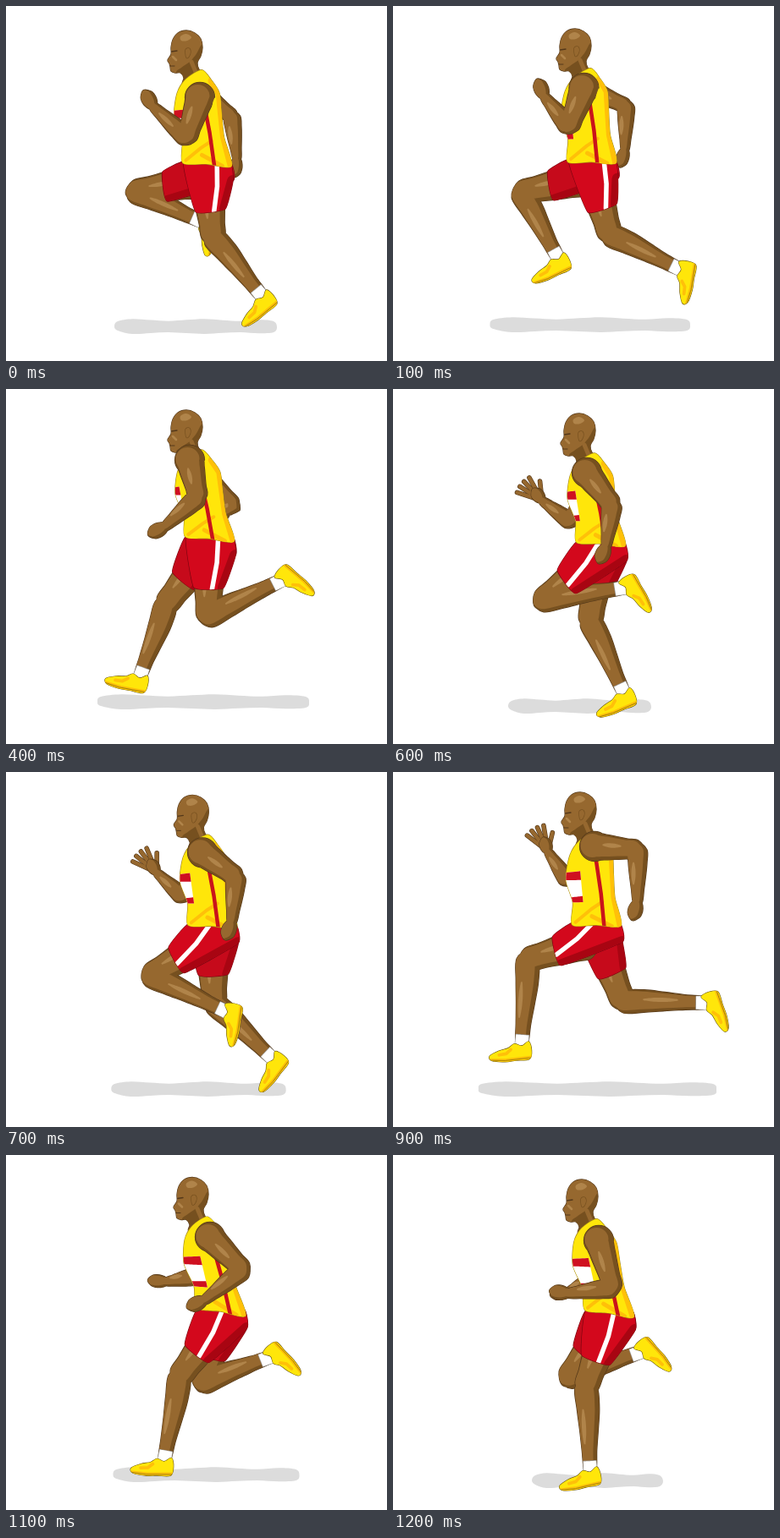
Write an HTML page with a canvas that moves like this. It is 450x420 px and loops after 1.3 s.

```html
<!DOCTYPE html>
<html lang="en">
<head>
<meta charset="utf-8">
<title>Runner</title>
<style>
html, body { margin: 0; width: 100%; height: 100%; overflow: hidden; background: #fff; }
canvas { display: block; }
</style>
</head>
<body>
<canvas id="stage" width="450" height="420"></canvas>
<script>
const ctx = document.getElementById('stage').getContext('2d');
const LOOP = 1300, STEP = 100, RAD = Math.PI / 180;
const INK = '#54381a', DARK = '#76501f', SKIN = '#96682f', LIGHT = '#b0844a';
const YELLOW = '#ffe60a', AMBER = '#ffc009', RED = '#d3081c', WINE = '#a80512';

// Joints only: near arm from the shoulder, far arm from the elbow, legs from the knee.
const keys = [];
const key = (time, pose) => keys.push({ time, ...pose });

key(0, {
  neck: [222, 81], hem: [237, 187], shadow: [128, 320, 379],
  nearArm: [229, 108, 214, 156, 174, 119], farArm: [267, 131, 273, 181],
  nearLeg: [245, 274, 303, 344], farLeg: [152, 220, 231, 255]
});
key(200, {
  neck: [226, 77], hem: [232, 182], shadow: [101, 382, 375],
  nearArm: [222, 86, 203, 130, 183, 97], farArm: [284, 106, 275, 158],
  nearLeg: [268, 268, 362, 271], farLeg: [151, 221, 139, 313]
});
key(300, { shadow: [87, 372, 372], farLeg: [176, 247, 137, 341] });
key(400, {
  neck: [222, 77], hem: [240, 177], shadow: [108, 358, 370],
  nearArm: [217, 84, 227, 128, 188, 163], farArm: [269, 136, 261, 146],
  nearLeg: [239, 270, 326, 226], farLeg: [189, 255, 158, 341]
});
key(500, { farLeg: [218, 274, 221, 369] });
key(600, {
  neck: [229, 81], hem: [245, 183], shadow: [136, 305, 375],
  nearArm: [229, 99, 259, 137, 252, 186], farArm: [210, 157, 176, 132],
  nearLeg: [176, 251, 274, 235], farLeg: [233, 275, 273, 360]
});
key(900, {
  neck: [230, 76], hem: [240, 181], shadow: [101, 382, 375],
  nearArm: [238, 88, 289, 92, 289, 154], farArm: [206, 128, 183, 94],
  nearLeg: [159, 222, 152, 323], farLeg: [272, 272, 370, 273]
});
key(1000, {
  neck: [226, 76], hem: [252, 183], shadow: [89, 374, 371],
  nearArm: [239, 93, 288, 108, 266, 167], farArm: [212, 138, 173, 135],
  nearLeg: [182, 250, 141, 344], farLeg: [258, 276, 331, 245]
});
key(1200, {
  neck: [232, 81], hem: [255, 187], shadow: [164, 319, 385],
  nearArm: [243, 101, 260, 157, 207, 164], farArm: [232, 150, 207, 162],
  nearLeg: [228, 275, 233, 374], farLeg: [207, 264, 293, 233]
});

const lerp = (a, b, u) => a + (b - a) * u;
const between = (p, q, u) => [lerp(p[0], q[0], u), lerp(p[1], q[1], u)];
const pairs = v => Array.from({ length: v.length >> 1 }, (_, i) => [v[2 * i], v[2 * i + 1]]);
const angle = (p, q) => Math.atan2(q[1] - p[1], q[0] - p[0]);
const dist = (p, q) => Math.hypot(q[0] - p[0], q[1] - p[1]);
const polar = (p, a, r) => [p[0] + Math.cos(a) * r, p[1] + Math.sin(a) * r];

// Bones turn about their joints by the shorter way.
function swing(a, b, u) {
  const p = pairs(a), q = pairs(b), out = [between(p[0], q[0], u)];
  for (let i = 1; i < p.length; i++) {
    const from = angle(p[i - 1], p[i]);
    const turn = Math.atan2(...[Math.sin, Math.cos].map(f => f(angle(q[i - 1], q[i]) - from)));
    const len = lerp(dist(p[i - 1], p[i]), dist(q[i - 1], q[i]), u);
    out.push(polar(out[i - 1], from + turn * u, len));
  }
  return out.flat();
}

function part(name, time) {
  const track = keys.filter(k => k[name]);
  const i = track.findIndex(k => k.time >= time);
  const b = track[i], a = track[i - 1] || b;
  const u = a === b ? 0 : (time - a.time) / (b.time - a.time);
  return /Arm|Leg/.test(name) ? swing(a[name], b[name], u)
    : a[name].map((v, j) => lerp(v, b[name][j], u));
}

function curve(path, pts, bend = 1 / 6) {
  const n = pts.length, at = i => pts[(i + n) % n];
  path.moveTo(...pts[0]);
  for (let i = 0; i < n; i++) {
    const [p, a, b, q] = [at(i - 1), at(i), at(i + 1), at(i + 2)];
    path.bezierCurveTo(
      a[0] + (b[0] - p[0]) * bend, a[1] + (b[1] - p[1]) * bend,
      b[0] - (q[0] - a[0]) * bend, b[1] - (q[1] - a[1]) * bend, ...b);
  }
  path.closePath();
  return path;
}
const shape = (pts, bend) => curve(new Path2D(), pts, bend);

function line(pts, color, width) {
  ctx.beginPath();
  pts.forEach(p => ctx.lineTo(...p));
  ctx.strokeStyle = color;
  ctx.lineWidth = width;
  ctx.stroke();
}

function paint(path, color, ink, inside) {
  ctx.strokeStyle = ink;
  ctx.lineWidth = 1.3;
  ctx.stroke(path);
  fill(path, color);
  if (!inside) return;
  ctx.save();
  ctx.clip(path);
  inside();
  ctx.restore();
}

function fill(path, color, dx = 0, dy = 0) {
  ctx.save();
  ctx.translate(dx, dy);
  ctx.fillStyle = color;
  ctx.fill(path);
  ctx.restore();
}

// Point beside the line a-b: u along it, w to its front side.
function beside(a, b, u, w) {
  return polar(between(a, b, u), angle(a, b) + Math.PI / 2, w);
}

// Rounded segment with a width profile on each side.
function bone(path, a, b, front, back = front, k = 1) {
  const last = front.length - 1, len = dist(a, b) || 1;
  const left = front.map((w, i) => beside(a, b, i / last, w * k));
  const right = back.map((w, i) => beside(a, b, i / last, -w * k)).reverse();
  const cap = w => w * 0.8 * k / len;
  curve(path, [...left, between(a, b, 1 + cap(front[last])), ...right, between(a, b, -cap(front[0]))]);
}

const THIGH = [19, 18.5, 17, 15, 13.5], SHIN = [13, 12, 10, 8.5, 7], CALF = [13, 14.5, 12, 9, 7];
const UPPER = [15, 15, 13.5, 12, 11], FORE = [11, 11, 9.5, 7.5, 5.5], PALM = [5.5, 8, 8.5, 7];

// build(path, k) adds the outline at scale k.
function flesh(build, shines) {
  const body = k => {
    const path = new Path2D();
    build(path, k);
    return path;
  };
  paint(body(1), DARK, INK, () => {
    fill(body(0.8), SKIN, -2.5, -1);
    const shine = new Path2D();
    for (const [a, b] of shines) bone(shine, between(a, b, 0.3), between(a, b, 0.7), [1, 2.4, 2.4, 1]);
    fill(shine, LIGHT, -5, -3);
  });
}

function arm(v, size, open) {
  const [a, b, c] = pairs(v);
  const aim = angle(b, c) + 0.28, tip = polar(c, aim, open ? 13 : 17);
  const fingers = open ? [-0.6, -0.35, -0.1, 0.15, 0.55].map((s, i) =>
    [c, polar(c, aim + s, i === 4 ? 23 : 31)]) : [];
  fingers.forEach(f => line(f, INK, 5.6));
  fingers.forEach(f => line(f, SKIN, 4.4));
  flesh((path, k) => {
    bone(path, a, b, UPPER, UPPER, k * size);
    bone(path, b, c, FORE, FORE, k * Math.sqrt(size));
    bone(path, c, tip, PALM, PALM, k * Math.sqrt(size));
    path.moveTo(a[0] + 17.5 * k * size, a[1]);
    path.arc(...a, 17.5 * k * size, 0, 7, true);
  }, [[a, b], [b, c]]);
}

const SHOE = pairs([-9, -2, 0, 1, 9, -4, 12, 7, 9, 18, -8, 19, -22, 20, -38, 18, -41, 12, -29, 6, -17, 3]);

// The foot follows the shin, and flattens while pushing off.
function footAngle(shin) {
  const deg = shin / RAD;
  return ((deg - 97) * 1.1 + 18 * Math.exp(-(((deg - 58) / 18) ** 2))) * RAD;
}

function leg(hip, [knee, ankle]) {
  flesh((path, k) => {
    bone(path, hip, knee, THIGH, THIGH, k);
    bone(path, knee, ankle, SHIN, CALF, k);
  }, [[hip, knee], [knee, ankle]]);
  const cuff = 1 - 12 / dist(knee, ankle);
  paint(shape([beside(knee, ankle, cuff, 7.5), beside(knee, ankle, 1.04, 8),
    beside(knee, ankle, 1.04, -8), beside(knee, ankle, cuff, -7.5)], 0), '#fff', '#999');
  ctx.save();
  ctx.translate(...ankle);
  ctx.rotate(footAngle(angle(knee, ankle)));
  ctx.scale(0.94, 0.94);
  paint(shape(SHOE), YELLOW, '#6b560c', () => {
    line([[-42, 17], [-20, 18], [12, 16]], AMBER, 4);
    line([[-14, 5], [-20, 10], [-29, 11]], AMBER, 4);
    line([[-43, 17], [-22, 18.5], [12, 16.5]], '#8d7209', 0.8);
  });
  ctx.restore();
}

const hipOf = (hem, knee) => [hem[0] + (knee[0] - hem[0]) * 0.12, hem[1] + 20];

// Shorts run from the waist to halfway down the thigh.
function shorts(hem, hip, knee, color, stripe) {
  const front = beside(hip, knee, 0.52, 17.5), back = beside(hip, knee, 0.52, -17.5);
  const waist = [hem[0] - 27, hem[1] - 3], seat = [hem[0] + 31, hem[1] + 20];
  const cuff = beside(hip, knee, 0.54, -4);
  paint(shape([waist, [hem[0] + 27, hem[1] - 3], seat, back, front], 0.06), color, '#7d0510', () => {
    line([seat, back], WINE, 14);
    if (!stripe) return;
    const top = [hem[0] + 10 + (cuff[0] - hem[0]) * 0.25, hem[1] - 5];
    const mid = between(top, cuff, 0.5);
    line([top, [mid[0] + 2, mid[1] + 1], cuff], '#fff', 5.5);
  });
}

const SKULL = pairs([197, 40, 203, 32, 213, 29, 223, 32, 230, 39, 232, 49, 230, 59, 226, 67, 228, 75, 236, 84,
  225, 97, 209, 93, 210, 85, 206, 79, 200, 79, 195, 77, 194, 72, 193, 68, 191, 64, 195, 57, 195, 49]);

function head(neck) {
  ctx.save();
  ctx.translate(neck[0] - 222, neck[1] - 81);
  paint(shape(SKULL), SKIN, INK, () => {
    fill(shape(pairs([234, 46, 224, 58, 217, 66, 207, 73, 201, 79, 209, 92, 238, 94])), DARK);
    line([[219, 66], [224, 78], [226, 88]], SKIN, 5);
    fill(shape(pairs([206, 36, 213, 33, 219, 37, 214, 41, 207, 41])), LIGHT);
    line([[197, 60], [201, 64]], LIGHT, 2.5);
    line([[195, 54], [202, 53]], INK, 1.3);
    line([[193, 71], [199, 71]], INK, 1);
  });
  paint(shape(pairs([212, 52, 216, 50, 218, 54, 216, 60, 213, 61])), SKIN, DARK);
  ctx.restore();
}

// Shirt outline: distance from the spine, then share of its length.
const SHIRT = pairs([-10, 0.05, 10, -0.05, 20, 0.07, 27, 0.21, 26, 0.44, 25, 0.7, 29, 1.02,
  0, 1, -28, 0.99, -25, 0.74, -30.5, 0.48, -23, 0.21]);

function shirt(neck, hem, shoulder) {
  const lean = (hem[0] - neck[0] - 14) * 0.01, twist = shoulder[0] - neck[0];
  const at = ([x, v]) => {
    const p = between(neck, hem, v);
    return [p[0] + x, p[1] + x * v * lean];
  };
  const edge = twist * 0.9 - 20, side = 4 + twist * 0.4;
  const band = (u, v, color) => fill(shape([[-36, u], [edge, u - 0.02], [edge, v], [-36, v]].map(at), 0), color);
  paint(shape(SHIRT.map(at), 0.13), YELLOW, '#a38614', () => {
    line(SHIRT.slice(2, 7).map(at), AMBER, 9);
    line([[-24, 0.96], [-4, 0.82], [10, 0.74]].map(at), AMBER, 4);
    line([[18, 1.02], [-4, 0.9]].map(at), AMBER, 5);
    line([[side, 0.28], [side + 2, 0.65], [side + 2, 1.05]].map(at), '#c9131b', 4.5);
    band(0.41, 0.74, '#fff');
    band(0.41, 0.49, '#cf1020');
    band(0.69, 0.74, '#cf1020');
  });
}

function shadow([x0, x1, y]) {
  const top = [], under = [];
  for (let i = 1; i < 9; i++) {
    const x = lerp(x0, x1, i / 9), ripple = Math.sin(i * 1.6);
    top.push([x, y - 7.5 - ripple * 1.3]);
    under.unshift([x, y + 8 + ripple]);
  }
  fill(shape([[x0, y], [x0 + 4, y - 6], ...top, [x1 - 4, y - 6], [x1, y + 1], [x1 - 4, y + 7],
    ...under, [x0 + 4, y + 5]]), '#dcdcdc');
}

function draw(time) {
  const get = name => part(name, time);
  const neck = get('neck'), hem = get('hem'), nearArm = get('nearArm');
  const near = pairs(get('nearLeg')), far = pairs(get('farLeg'));
  const nearHip = hipOf(hem, near[0]), farHip = hipOf(hem, far[0]);
  const open = time >= 600 && time <= 900;

  ctx.fillStyle = '#fff';
  ctx.fillRect(0, 0, 450, 420);
  ctx.lineCap = ctx.lineJoin = 'round';
  shadow(get('shadow'));
  arm([neck[0] + 8, neck[1] + 20, ...get('farArm')], 0.75, open);
  leg(farHip, far);
  shorts(hem, farHip, far[0], '#c60a1b');
  leg(nearHip, near);
  shorts(hem, nearHip, near[0], RED, true);
  head(neck);
  shirt(neck, hem, nearArm);
  arm(nearArm, 1, false);
}

const start = performance.now();
function tick() {
  const t = (performance.now() - start) % LOOP;
  draw(Math.floor(t / STEP) * STEP);
  requestAnimationFrame(tick);
}
tick();
</script>
</body>
</html>
```
